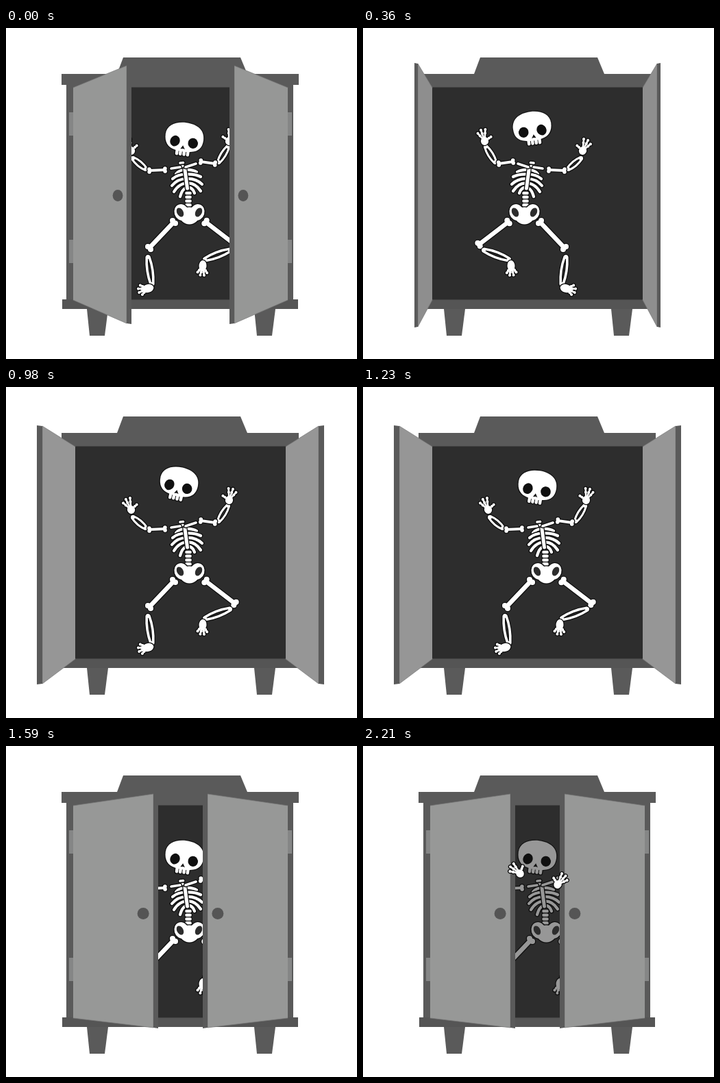
Animation of 512x483 px, one loop 2350 ms. Source, as an HTML page with a canvas:

```html
<!DOCTYPE html>
<html lang="en">
<head>
<meta charset="utf-8">
<title>Skeleton in the closet</title>
<style>
html, body { margin: 0; width: 100%; height: 100%; overflow: hidden; background: #fff; }
canvas { display: block; }
</style>
</head>
<body>
<canvas id="stage" width="512" height="483"></canvas>
<script>
const ctx = document.getElementById('stage').getContext('2d');
const LOOP = 2350, FRAME = '#5a5a5a', DARK = '#2d2d2d', INK = '#101010';
let tone = '#fff';

// Door poses: free edge x, top, bottom, thickness, face colour
const DOORS = {
  shut: [254, 85, 397, 1, '#979797'],
  slit: [237, 77, 405, 5, '#979897'],
  ajar: [215, 70, 411, 7, '#979897'],
  half: [176, 55, 431, 7, '#969796'],
  wide: [146, 53, 434, 8, '#929292'],
  side: [113, 52, 435, 8, '#888'],
  back: [80, 52, 436, -5, '#8e8e8e'],
  open: [53, 57, 433, -8, '#969696']
};

// start, door, mirrored, head x, head y, head tilt
const STEPS = [
  [0, 'half', 0, 260, 162, 8],
  [130, 'wide', 0, 260, 157, 8],
  [250, 'side', 0, 260, 152, 8],
  [360, 'back', 1, 256, 146, 8],
  [490, 'open', 0, 253, 141, 10],
  [610, 'open', 1, 252, 137, 7],
  [730, 'open', 0, 252, 139, 11],
  [860, 'open', 1, 252, 137, 8],
  [980, 'open', 0, 252, 141, 13],
  [1110, 'open', 1, 252, 141, 8],
  [1230, 'open', 0, 254, 146, 10],
  [1360, 'side', 0, 259, 155, 8],
  [1480, 'half', 0, 260, 162, 8],
  [1590, 'ajar', 0, 260, 162, 8],
  [1700, 'slit', 0, 260, 162, 8],
  [1810, 'shut', 0, 260, 162, 8],
  [2060, 'slit', 0, 254, 162, 8],
  [2210, 'ajar', 0, 254, 162, 8]
];

function poly(color, ...p) {
  ctx.fillStyle = color;
  ctx.beginPath();
  for (let i = 0; i < p.length; i += 2) ctx.lineTo(p[i], p[i + 1]);
  ctx.fill();
}

function rect(color, x0, y0, x1, y1) {
  ctx.fillStyle = color;
  ctx.fillRect(x0, y0, x1 - x0, y1 - y0);
}

function oval(color, x, y, rx, ry = rx, turn = 0) {
  ctx.fillStyle = color;
  ctx.beginPath();
  ctx.ellipse(x, y, rx, ry, turn, 0, 7);
  ctx.fill();
}

// Paints a shape twice: a grown dark one, then the bone itself
function inked(draw) {
  draw(INK, 1.3);
  draw(tone, 0);
}

function curve(color, w, x0, y0, cx, cy, x1, y1) {
  ctx.strokeStyle = color;
  ctx.lineWidth = w;
  ctx.beginPath();
  ctx.moveTo(x0, y0);
  ctx.quadraticCurveTo(cx, cy, x1, y1);
  ctx.stroke();
}

function line(color, w, x0, y0, x1, y1) {
  curve(color, w, x0, y0, x0, y0, x1, y1);
}

function bone(x0, y0, x1, y1, w, knob) {
  const a = Math.atan2(y1 - y0, x1 - x0);
  const nx = -Math.sin(a) * knob * .7, ny = Math.cos(a) * knob * .7;
  inked((c, g) => {
    line(c, w + 2 * g, x0, y0, x1, y1);
    for (const [x, y] of [[x0, y0], [x1, y1]])
      for (const s of [-1, 1]) oval(c, x + s * nx, y + s * ny, knob + g);
  });
}

// Two slim bones that bow apart
function twin(x0, y0, x1, y1, bow, w) {
  const len = Math.hypot(x1 - x0, y1 - y0);
  const nx = (y0 - y1) / len, ny = (x1 - x0) / len;
  const mx = (x0 + x1) / 2, my = (y0 + y1) / 2;
  inked((c, g) => {
    for (const s of [-1, 1]) {
      const e = s * 1.8, b = s * bow;
      curve(c, w + 2 * g, x0 + nx * e, y0 + ny * e, mx + nx * b, my + ny * b, x1 + nx * e, y1 + ny * e);
    }
    oval(c, x0, y0, 3 + g);
    oval(c, x1, y1, 3 + g);
  });
}

// Palm with digits fanned out at [degrees, length]
function digits(x, y, rx, ry, turn, fan) {
  ctx.save();
  ctx.translate(x, y);
  ctx.rotate(turn * Math.PI / 180);
  inked((c, g) => {
    for (const [deg, len] of fan) {
      const a = deg * Math.PI / 180, dx = Math.sin(a), dy = -Math.cos(a);
      line(c, 2.6 + 2 * g, 0, 0, dx * len, dy * len);
      for (const k of [.68, 1]) oval(c, dx * len * k, dy * len * k, 2 + g);
    }
    oval(c, 0, 0, rx + g, ry + g);
  });
  ctx.restore();
}

const FINGERS = [[-36, 15], [-13, 17], [9, 17], [62, 11]];
const TOES = [[-34, 12], [-11, 14], [12, 14], [36, 12]];

function hand(x, y, turn, side = 1) {
  digits(x, y, 5.6, 6, turn, FINGERS.map(([a, l]) => [a * side, l]));
}

function skull(x, y, tilt) {
  ctx.save();
  ctx.translate(x, y);
  ctx.rotate(tilt * Math.PI / 180);
  inked((c, g) => {
    for (const t of [-8, -2.8, 2.6, 8]) line(c, 4.4 + 2 * g, t, 14, t, 22.5);
    const dome = new Path2D('M-28-4C-28-17-15-24 0-24C16-24 28-17 28-2C28 9 23 15 13 17Q0 20-12 17C-22 15-28 8-28-4Z');
    ctx.fillStyle = ctx.strokeStyle = c;
    ctx.lineWidth = 2 * g || .1;
    ctx.fill(dome);
    ctx.stroke(dome);
  });
  oval(INK, -13, 4.5, 7, 8, .3);
  oval(INK, 13.5, 4.5, 7.3, 7.6, -.3);
  poly(INK, -.5, 9.5, 3, 15, .3, 14, -3.6, 15);
  ctx.restore();
}

function torso() {
  for (let i = 0; i < 4; i++)
    inked((c, g) => line(c, 4.6 + 2 * g, 263.5, 241 + i * 5.8, 268.5, 241 + i * 5.8));
  for (let i = 0; i < 2; i++)
    inked((c, g) => line(c, 3.6 + 2 * g, 254, 197 + i * 5, 258.5, 196.5 + i * 5));
  const ribs = [[248, 213, 278, 210], [243, 220, 284, 217], [242, 230, 286, 228], [245, 239, 284, 238], [254, 246, 275, 241]];
  ribs.forEach(([lx, ly, rx, ry], i) => {
    const x = 261 + i, y = 207 + i * 6.5;
    inked((c, g) => {
      curve(c, 4.2 + 2 * g, x, y, (x + lx) / 2 - 2, y, lx, ly);
      curve(c, 4.2 + 2 * g, x, y, (x + rx) / 2 + 2, y - 1, rx, ry);
    });
  });
  inked((c, g) => line(c, 5 + 2 * g, 261, 207, 264.5, 234));
  inked((c, g) => line(c, 3.6 + 2 * g, 241, 205, 254, 203));
  inked((c, g) => line(c, 3.6 + 2 * g, 262, 203, 277, 198));
}

function pelvis() {
  inked((c, g) => {
    oval(c, 256, 269, 10.5 + g, 12 + g, -.3);
    oval(c, 279, 269, 10.5 + g, 12 + g, .3);
    oval(c, 267.5, 274, 14 + g, 12.5 + g);
  });
  oval(DARK, 254, 269, 4.6, 7, -.5);
  oval(DARK, 281, 269, 4.6, 7, .5);
}

function skeleton(mirrored, hx, hy, tilt) {
  ctx.save();
  if (mirrored) {
    ctx.translate(503, 0);
    ctx.scale(-1, 1);
  }
  twin(204, 206, 185, 190, 5.5, 3);
  bone(232, 207, 209, 208, 4, 2.8);
  hand(182.5, 179, -14);
  twin(310, 196, 324, 173, 5.5, 3);
  bone(284, 195, 305, 198, 4, 2.8);
  hand(325.5, 165, 6, -1);
  torso();
  bone(245, 283, 209, 321, 6.5, 4);
  twin(207, 334, 213, 374, 6, 3.6);
  digits(207, 380, 6, 8.5, -104, TOES);
  bone(291, 283, 334, 316, 6.5, 4);
  twin(327, 324, 290, 338, 6, 3.6);
  digits(287, 347, 5.5, 8, 183, TOES);
  pelvis();
  skull(hx, hy, tilt);
  ctx.restore();
}

function cabinet() {
  poly(FRAME, 171, 43, 342, 43, 352, 67, 162, 67);
  rect(FRAME, 81, 67, 427, 83);
  rect(FRAME, 88, 83, 419, 397);
  rect('#555', 82, 396, 426, 410);
  poly(FRAME, 118, 410, 149, 410, 144, 449, 122, 449);
  poly(FRAME, 362, 410, 393, 410, 388, 449, 366, 449);
  rect('#444', 100, 86, 409, 397);
  rect(DARK, 101, 87, 408, 396);
}

function leftDoor([x, top, bottom, thick, face]) {
  const inside = thick < 0, hinge = inside ? 101 : 98;
  const y0 = top > 80 ? top : 87;
  if (!inside) for (const y of [123, 309]) rect('#858686', 92, y, 98, y + 34);
  poly(face, hinge, y0, x, top, x, bottom, hinge, 397);
  ctx.strokeStyle = '#777';
  ctx.lineWidth = .7;
  ctx.stroke();
  poly(FRAME, x, top, x + thick, top - (inside ? 1 : 0), x + thick, bottom + 1, x, bottom);
  if (inside) return;
  const r = 8.5 * Math.min(1, ((x - hinge) / 110) ** .4);
  oval('#555', x - 1.75 * r, 244.5, r, 8.5);
}

function doors(pose) {
  leftDoor(pose);
  ctx.save();
  ctx.translate(509, 0);
  ctx.scale(-1, 1);
  leftDoor(pose);
  ctx.restore();
}

function draw(t) {
  const [start, door, mirrored, hx, hy, tilt] = STEPS.findLast(s => s[0] <= t);
  rect('#fff', 0, 0, 512, 483);
  cabinet();
  tone = start >= 2060 ? '#979797' : '#fff';
  if (door !== 'shut') skeleton(mirrored, hx, hy, tilt);
  doors(DOORS[door]);
  if (start === 2210) {
    tone = '#fff';
    hand(229, 186, -42);
    hand(284, 202, 30, -1);
  }
}

ctx.lineCap = ctx.lineJoin = 'round';
const begin = performance.now();
function tick() {
  draw((performance.now() - begin) % LOOP);
  requestAnimationFrame(tick);
}
tick();
</script>
</body>
</html>
```
